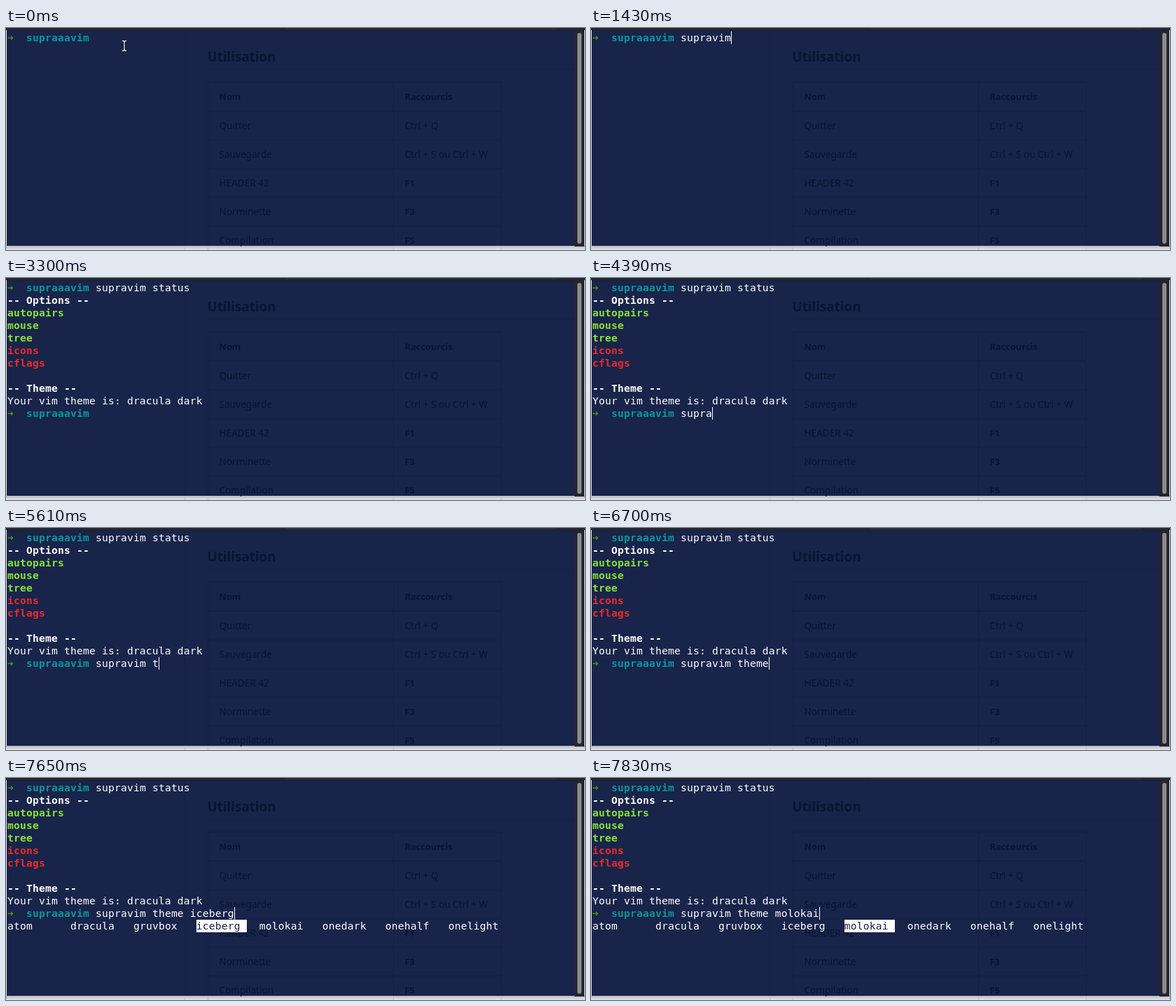
Animation, 827 px wide and 318 px high, one loop 8 s. Source, as an HTML page:

```html
<!DOCTYPE html>
<html lang="fr">
<head>
<meta charset="utf-8">
<title>Terminal</title>
<style>
  html, body { margin: 0; width: 100%; height: 100%; overflow: hidden; }
  svg { display: block; background: #e9e8ea; }
  #labels text { font: 13.6px "Noto Sans", "Open Sans", sans-serif; fill: #0a1434; }
  #labels .head { font-size: 12.8px; font-weight: 700; }
  #labels .title { font-size: 18.8px; font-weight: 700; }
  #rows text {
    font: 14.667px "DejaVu Sans Mono", monospace; letter-spacing: 0.17px;
    font-variant-ligatures: none; white-space: pre; fill: #fff;
  }
  .bold, .arrow, .dir, .on, .off { font-weight: 700; }
  .arrow { fill: #4e9a06; }
  .dir { fill: #0c979b; }
  .on { fill: #8ae234; }
  .off { fill: #ef2929; }
  .picked { fill: #18244a; }
</style>
</head>
<body>
<svg width="827" height="318">
  <defs>
    <linearGradient id="shadow" x1="0" y1="0" x2="0" y2="1">
      <stop offset="0" stop-color="#b9b9bf"/>
      <stop offset="1" stop-color="#e6e5e8"/>
    </linearGradient>
  </defs>
  <rect y="312" width="827" height="6" fill="url(#shadow)"/>
  <path d="M255.5 312v6M288.5 312v6M553.5 312v6M707.5 312v6" stroke="#c3c3c8"/>
  <rect x="1" width="825" height="312" fill="#18244a"/>
  <rect width="827" height="3" fill="#24262f"/>
  <rect x="400" width="386" height="2" fill="#2b2d36"/>
  <rect x="1" y="3" width="825" height="1" fill="#1b2236"/>
  <g fill="none" stroke="#141f43">
    <path d="M255.5 4V312M288 59.5H812" stroke="#162146"/>
    <path d="M288.5 77V312M553.5 77V312M707.5 77V312"/>
    <path d="M288 77.5H708M288 160.5H708M288 201.5H708M288 242.5H708M288 283.5H708"/>
    <path d="M288 119H708" stroke-width="2"/>
  </g>
  <g id="labels"></g>
  <rect x="812" y="3" width="14" height="310" fill="#24242d"/>
  <rect x="816" y="7" width="6" height="302" rx="3" fill="#8b8b8e"/>
  <rect id="mark" width="72" height="18" fill="#fff"/>
  <g id="rows"></g>
  <rect id="cursor" width="1" height="18" fill="#fff"/>
  <g id="mouse" fill="none">
    <path id="beam" d="M166 18.5h2l1 1 1-1h2M169 19.5v12M166 32.5h2l1-1 1 1h2" stroke="#000" stroke-width="3"/>
    <use href="#beam" style="display:none"/>
    <path d="M166 18.5h2l1 1 1-1h2M169 19.5v12M166 32.5h2l1-1 1 1h2" stroke="#fff" stroke-width="1.3"/>
  </g>
</svg>
<script>
const LOOP = 8000, CELL = 9, LINE = 18, LEFT = 2, TOP = 5, ASCENT = 14;
const PROMPT_COLS = 14, MENU_COLS = 10;
const OUTPUT = 2740, REST = 2780, PROMPT = 3000, MENU = 6870;
const FIRST_PICK = 7200, PICK_STEP = 150;

const $ = id => document.getElementById(id);
function make(tag, cls, text = '') {
  const el = document.createElementNS('http://www.w3.org/2000/svg', tag);
  el.setAttribute('class', cls);
  el.textContent = text;
  return el;
}
function place(el, x, y) {
  el.setAttribute('x', x);
  el.setAttribute('y', y);
}
function show(el, on) {
  el.style.visibility = on ? 'visible' : 'hidden';
}

// Page seen through the terminal
function label(text, x, y, cls = '') {
  const el = make('text', cls, text);
  place(el, x, y);
  $('labels').append(el);
}
label('Utilisation', 287.5, 48, 'title');
label('Nom', 304.5, 103, 'head');
label('Raccourcis', 569.5, 103, 'head');
[['Quitter', 'Ctrl + Q'], ['Sauvegarde', 'Ctrl + S ou Ctrl + W'], ['HEADER 42', 'F1'],
 ['Norminette', 'F3'], ['Compilation', 'F5']].forEach(([name, keys], i) => {
  const y = 145 + i * 41;
  label(name, 304.5, y);
  label(keys, 569.5, y, i > 1 ? 'head' : '');
});

// Terminal rows, each with the time it appears
const rows = [];
const span = (cls, text) => make('tspan', cls, text);
function addRow(time, ...parts) {
  const el = make('text', '');
  el.append(...parts);
  place(el, LEFT, TOP + ASCENT + rows.length * LINE);
  $('rows').append(el);
  rows.push({ el, time });
}
function addPrompt(time) {
  const input = span('', '');
  addRow(time, span('arrow', '➜'), '  ', span('dir', 'supraaavim'), ' ', input);
  return input;
}
const firstInput = addPrompt(0);
addRow(OUTPUT, span('bold', '-- Options --'));
addRow(OUTPUT, span('on', 'autopairs'));
['mouse', 'tree'].forEach(s => addRow(REST, span('on', s)));
['icons', 'cflags'].forEach(s => addRow(REST, span('off', s)));
addRow(REST, '');
addRow(REST, span('bold', '-- Theme --'));
addRow(REST, 'Your vim theme is: dracula dark');
const secondInput = addPrompt(PROMPT);
const themes = ['atom', 'dracula', 'gruvbox', 'iceberg', 'molokai', 'onedark', 'onehalf', 'onelight'];
const choices = themes.map(s => span('', s.padEnd(MENU_COLS)));
addRow(MENU, ...choices);

// Bursts of typing: text, time of its first key, time of its last key
const firstBursts = [['s', 390], ['upra', 870, 1040], ['v', 1220], ['im', 1430], [' s', 1610, 1700],
  ['tat', 2220, 2350], ['u', 2520], ['s', OUTPUT]];
const secondBursts = [['su', 4000, 4040], ['pra', 4220, 4390], ['vi', 4650, 4780], ['m', 4960],
  [' theme', 5480, 6000], [' ', MENU]];
function typed(bursts, t) {
  return bursts.map(([text, from, to = from]) => {
    const gap = (to - from) / Math.max(1, text.length - 1);
    return [...text].filter((_, i) => t >= from + i * gap).join('');
  }).join('');
}
const cursorGaps = [[0, 390], [3300, 3830], [6520, 6700]];

function draw(t) {
  const pick = Math.floor((t - FIRST_PICK) / PICK_STEP);
  const first = typed(firstBursts, t);
  const second = typed(secondBursts, t) + (themes[pick] || '');
  firstInput.textContent = first;
  secondInput.textContent = second;
  rows.forEach(r => show(r.el, t >= r.time));
  choices.forEach((el, i) => el.setAttribute('class', i === pick ? 'picked' : ''));
  place($('mark'), LEFT + pick * MENU_COLS * CELL, TOP + (rows.length - 1) * LINE);
  show($('mark'), pick >= 0);

  let row = rows.filter(r => t >= r.time).length, col = 0;
  if (t < OUTPUT) {
    row = 0;
    col = PROMPT_COLS + first.length;
  } else if (t >= PROMPT) {
    row = rows.length - 2;
    col = PROMPT_COLS + second.length;
  }
  place($('cursor'), LEFT + col * CELL, TOP + row * LINE);
  show($('cursor'), !cursorGaps.some(([from, to]) => t >= from && t < to));
  show($('mouse'), t < 480);
}

const start = performance.now();
function tick() {
  draw((performance.now() - start) % LOOP);
  requestAnimationFrame(tick);
}
tick();
</script>
</body>
</html>
```
